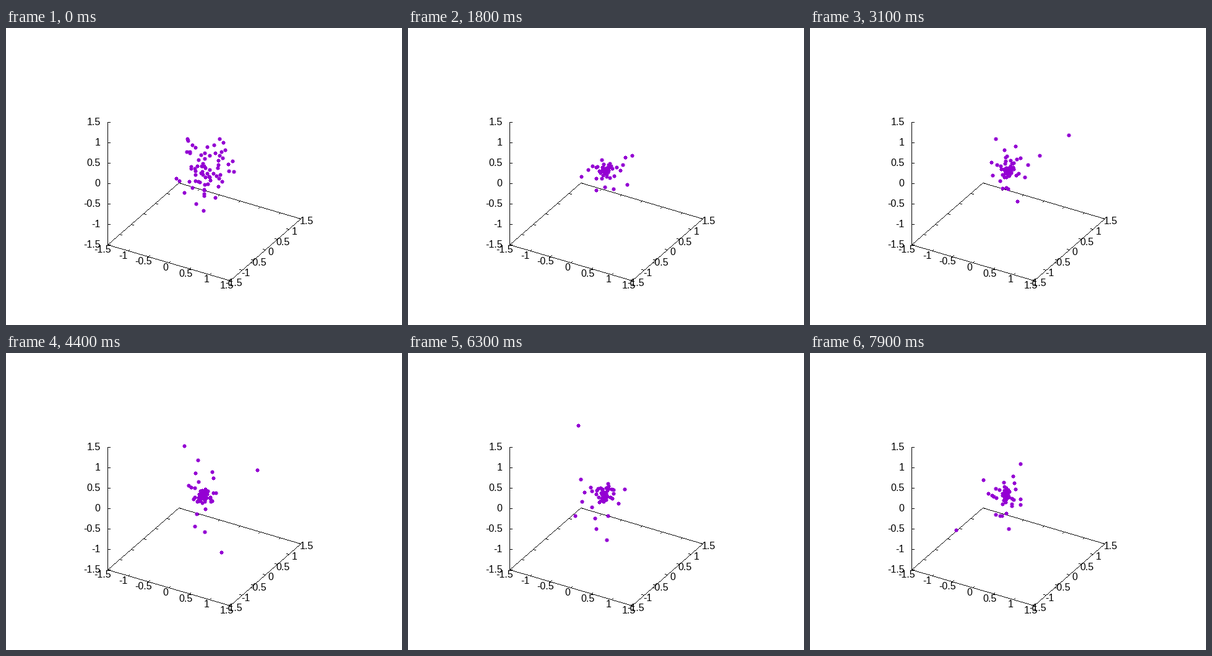
Recreate the animation shown at these times as a matplotlib script. Size 640 by 480 pixels, loop 8 s.

```python
import numpy as np
import matplotlib.pyplot as plt
from matplotlib.animation import FuncAnimation

W, H, DPI = 640, 480, 100
FRAMES, INTERVAL = 80, 100
VIOLET = (148, 0, 211)
FONT_PT = 16 * 72 / DPI

plt.rcParams["font.family"] = "Liberation Sans"
fig = plt.figure(figsize=(W / DPI, H / DPI), dpi=DPI, facecolor="white")
ax = fig.add_axes([0, 0, 1, 1])
ax.axis("off")

# Hard-edged lines and dots are rasterised here, text is drawn on top
paper = np.full((H, W, 3), 255, np.uint8)

# Corners of the base plane and top of the z axis
LEFT, FRONT, RIGHT, BACK, TOP = np.array(
    [(164, 350), (362, 408), (476, 308), (279, 250), (164, 152)])
VALUES = np.linspace(-1.5, 1.5, 7)


def line(a, b):
    n = int(np.abs(np.subtract(b, a)).max()) + 1
    x, y = np.rint(np.linspace(a, b, n)).astype(int).T
    paper[y, x] = 0


def ticks(a, b, step):
    for p in np.rint(np.linspace(a, b, len(VALUES))):
        line(p, p + step)


def labels(a, b, align, sign_gap=0):
    """Label an axis; numbers without a minus sign move right by sign_gap."""
    for (x, y), v in zip(np.linspace(a, b, len(VALUES)), VALUES):
        ax.text(x + sign_gap * (v >= 0), y + 4.7, f"{v:g}", ha=align,
                va="baseline", fontsize=FONT_PT)


for a, b in [(LEFT, FRONT), (FRONT, RIGHT), (RIGHT, BACK), (BACK, LEFT), (LEFT, TOP)]:
    line(a, b)
ticks(LEFT, FRONT, (2, -2))
ticks(BACK, RIGHT, (-2, 2))
ticks(FRONT, RIGHT, (-4, -1))
ticks(LEFT, BACK, (4, 1))
ticks(LEFT, TOP, (4, 0))
labels((152, 350), (152, 152), "right")
labels((156, 358), (354, 415.5), "center", 2.2)
labels((368, 412), (483, 312), "center", 2.2)

# Bodies thrown out of the core: (launch step, last step, end x, end y)
ESCAPES = [
    (11, 33, 424, 169),
    (18, 27, 308, 135),
    (18, 45, 408, 188),
    (20, 49, 352, 334),
    (12, 68, 272, 110),
    (48, 79, 236, 286),
]
# Bodies that climb and fall back: (launch step, turning step, turn x, turn y)
ARCS = [
    (22, 60, 321, 302),
    (20, 56, 303, 286),
    (24, 44, 310, 173),
    (60, 79, 340, 179),
    (34, 70, 277, 203),
]

# The rest falls in from a wide cloud and settles on eccentric orbits
N = 72
FALL = 17
rng = np.random.default_rng(5)


def directions():
    v = rng.normal(size=(N, 3))
    return v / np.linalg.norm(v, axis=1, keepdims=True)


start = (6 + 52 * rng.random((N, 1))) * directions()
radius = 4 + 36 * rng.random((N, 1)) ** 2.6
period = 7 + 1.6 * radius
phase = rng.uniform(0, 2 * np.pi, (N, 1))
major, minor = directions(), 0.6 * directions()


def core(t):
    return np.array([321, 231]) - np.array([5, 2]) * t / FRAMES


def cluster(t):
    wide = 0.5 + 0.5 * np.cos(np.pi * min(t / FALL, 1))
    a = phase + 2 * np.pi * t / period
    orbit = radius * (np.cos(a) * major + np.sin(a) * minor)
    p = wide * start + (1 - wide) * orbit
    return core(t) + p[:, :2] * (1, 1.18)


def thrown(t):
    for t0, t1, *end in ESCAPES:
        if t0 <= t <= t1:
            u = (t - t0) / (t1 - t0)
            yield core(t0) + u * (1.4 - 0.4 * u) * (end - core(t0))
    for t0, t1, *end in ARCS:
        u = (t - t0) / (t1 - t0)
        if 0 <= u <= 2:
            yield core(t0) + u * (2 - u) * (end - core(t0))


# Pixel offsets of one round dot
dy, dx = np.mgrid[-3:4, -3:4]
inside = np.hypot(dx, dy) <= 3
dx, dy = dx[inside], dy[inside]

picture = ax.imshow(paper, interpolation="nearest", aspect="auto")
ax.set_xlim(-0.5, W - 0.5)
ax.set_ylim(H - 0.5, -0.5)


def draw(t):
    canvas = paper.copy()
    pts = np.rint(np.vstack([cluster(t), *thrown(t)])).astype(int)
    for x, y in pts:
        canvas[y + dy, x + dx] = VIOLET
    picture.set_data(canvas)
    return picture,


anim = FuncAnimation(fig, draw, frames=FRAMES, interval=INTERVAL,
                     repeat=True, repeat_delay=0, blit=False)
plt.show()
```
